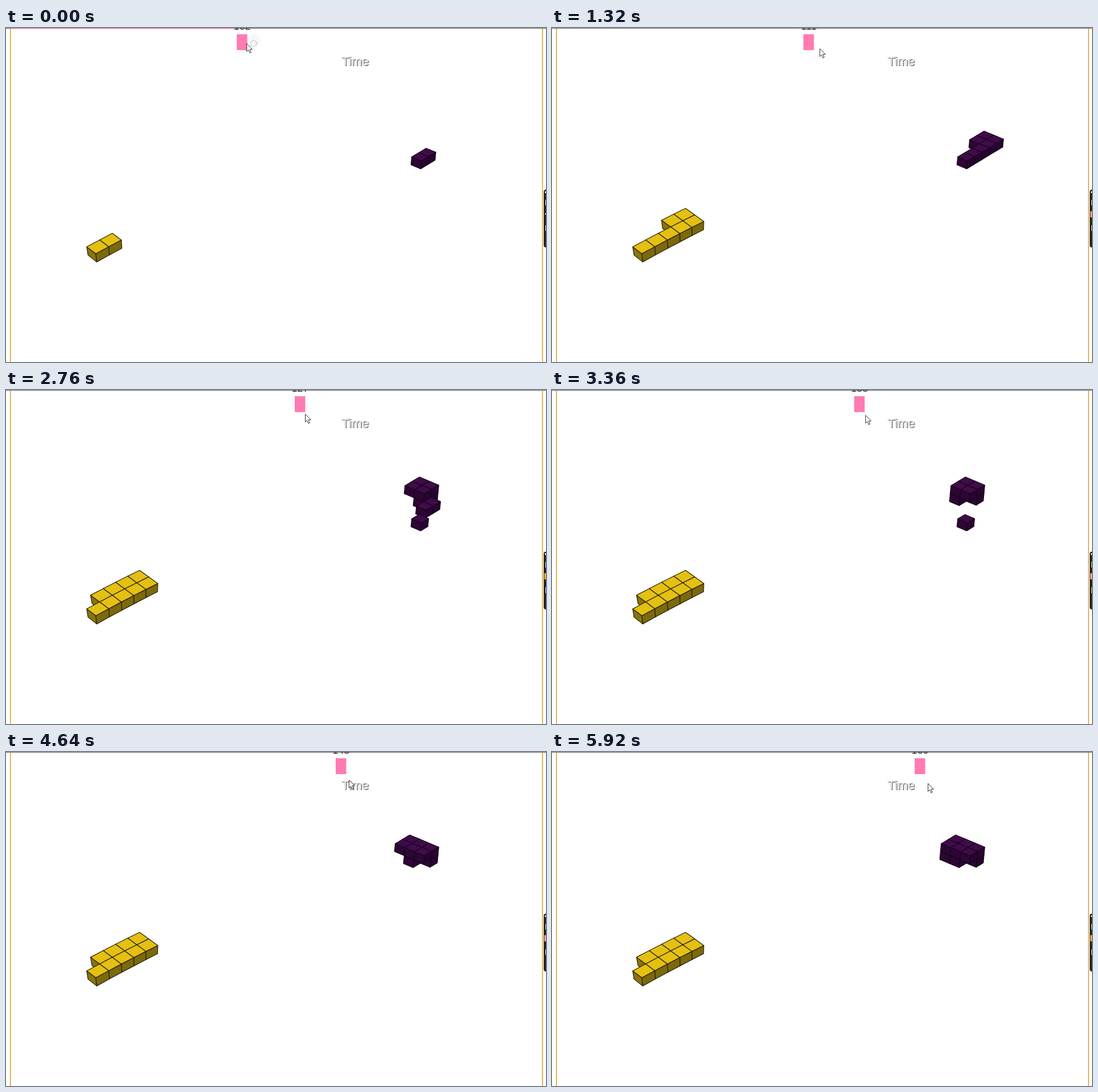
These frames come from a looping animation (950 px wide and 589 px high, 5.96 s). An HTML page with a canvas:

```html
<!DOCTYPE html>
<html lang="en">
<head>
<meta charset="utf-8">
<title>Blocks over time</title>
<style>
html, body { margin: 0; width: 100%; height: 100%; overflow: hidden; background: #fff; }
canvas { display: block; }
</style>
</head>
<body>
<canvas id="stage" width="950" height="589"></canvas>
<script>
const ctx = document.getElementById('stage').getContext('2d');
const LOOP = 5960, STEP = 40, HOLD = 120;

// Motion keys share one list of times.
const times = [0, 120, 680, 2000, 2760, 3880, 4640, 5920];
const barX = [406, 406, 419, 467, 508, 552, 580, 638];
const cursorX = [423, 423, 444, 499, 526, 573, 603, 661];
const cursorY = [27, 27, 33, 39, 42, 46, 49, 55];

function at(keys, t) {
  let i = 1;
  while (i < times.length - 1 && t > times[i]) i++;
  const k = (t - times[i - 1]) / (times[i] - times[i - 1]);
  return keys[i - 1] + (keys[i] - keys[i - 1]) * Math.min(k, 1);
}

// Top corner of grid point (u, v) and the drop to the bottom corner.
const yellow = {
  top: '#e4c012', left: '#88740f', right: '#7c690c', edge: '#241e04', line: 1.2, cubes: [],
  point(u, v) {
    const bend = 0.23 * u * (5 - u);
    return [126 + 21.8 * u + 16 * v + bend, 374 - 11.2 * u + 12 * v - 0.08 * u * v - bend];
  },
  drop: (u, v) => [3 - 0.7 * v - 0.4 * u, 14.6]
};
const purple = {
  top: '#400b49', left: '#2d0634', right: '#270530', edge: '#15021a', line: 1.1, cubes: [],
  point: (u, v) => [743 + 17.1 * v + 12.7 * (u - 5), 174.5 + 7.15 * v - 7.7 * (u - 5)],
  drop: () => [-1.3, 14]
};

// Row of cubes from u = a to b, added one by one every gap ms and removed at end.
function row(shape, a, b, v, z, start, gap = 0, end = LOOP) {
  const dir = Math.sign(b - a) || 1;
  for (let n = 0; n <= Math.abs(b - a); n++)
    shape.cubes.push({ u: a + n * dir, v, z, start: start + n * gap, end });
}

row(yellow, 0, 0, 1, 0, 0);
row(yellow, 1, 1, 1, 0, 0, 0, 1840);
row(yellow, 1, 1, 1, 0, 2280);
row(yellow, 2, 4, 1, 0, 320, 240);
row(yellow, 4, 1, 0, 0, 1040, 160);
row(yellow, 0, 0, 0, 0, 1680, 0, 2600);

row(purple, 0, 0, 2, 0, 0, 0, 4280);
row(purple, 1, 1, 2, 0, 0, 0, 2080);
row(purple, 2, 4, 2, 0, 320, 240, 2240);
row(purple, 4, 4, 1, 0, 1040, 0, 2400);
row(purple, 3, 2, 1, 0, 1200, 160, 3040);
row(purple, 4, 4, 0, 0, 1560);
row(purple, 3, 3, 0, 0, 1760, 0, 3320);
row(purple, 4, 3, 0, 1, 2320, 120);
row(purple, 4, 3, -1, 1, 2560, 120);
row(purple, 4, 3, -1, 0, 2920, 160);
row(purple, 4, 3, -2, 1, 3440, 200);
row(purple, 4, 3, -2, 0, 5000, 240);

for (const s of [yellow, purple])
  s.cubes.sort((a, b) => a.v - b.v || b.u - a.u || a.z - b.z);

function polygon(points, fill, stroke) {
  ctx.beginPath();
  points.forEach(p => ctx.lineTo(...p));
  ctx.closePath();
  ctx.fillStyle = fill;
  ctx.fill();
  ctx.strokeStyle = stroke;
  ctx.stroke();
}

function drawCube(s, { u, v, z }) {
  const corner = (du, dv, level) => {
    const [x, y] = s.point(u + du, v + dv), [dx, dy] = s.drop(u + du, v + dv);
    return [x - dx * level, y - dy * level];
  };
  const left = corner(0, 0, z), front = corner(0, 1, z);
  const right = corner(1, 1, z), back = corner(1, 0, z);
  const low = corner(0, 1, z - 1);
  polygon([left, front, low, corner(0, 0, z - 1)], s.left, s.edge);
  polygon([front, right, corner(1, 1, z - 1), low], s.right, s.edge);
  polygon([left, back, right, front], s.top, s.edge);
}

function drawShape(s, t) {
  ctx.lineWidth = s.line;
  ctx.lineJoin = 'round';
  for (const c of s.cubes) if (t >= c.start && t < c.end) drawCube(s, c);
}

function rect(color, x, y, w, h) {
  ctx.fillStyle = color;
  ctx.fillRect(x, y, w, h);
}

function text(str, x, y, color) {
  ctx.fillStyle = color;
  ctx.fillText(str, x, y);
}

function drawFrame(t) {
  rect('#d9a62e', 7, 0, 1.6, 589);
  rect('#d9a62e', 943, 0, 1.6, 589);
  rect('#8b8b8b', 0, 0, 950, 1.4);
  if (t < 400) rect('#f58db5', 8, 0, 393, 1.4);
  else if (t < 1300) rect('#d3a3b6', 440, 0, 503, 1.4);
}

function drawSidePanel(t) {
  ctx.fillStyle = '#242424';
  ctx.beginPath();
  ctx.roundRect(946, 285, 12, 102, 4);
  ctx.fill();
  rect('#ddd', 948, 288, 2, 3);
  rect('#eee', 949, 303, 1, 10);
  rect('#eee', 949, 348, 1, 10);
  const mark = t < 1320 ? '#ddd' : t < 2520 ? '#ef9d86' : t < 3120 ? '#dfb321'
    : t < 4320 ? '#f3a0a8' : t < 4920 ? '#eba58f' : '#e9a265';
  if (t < 1320) rect(mark, 948, 327, 2, 2);
  else rect(mark, 947, 323, 3, 11);
}

function drawBar(t) {
  const x = at(barX, t);
  ctx.font = '18px "Liberation Sans", Arial, sans-serif';
  ctx.textAlign = 'center';
  text(String(Math.round(x / 4)), x + 9.5, 2.6, '#333');
  rect('#ff7bb2', x, 11, 18.5, 28);
}

function drawTitle() {
  ctx.font = '22px "Liberation Sans", Arial, sans-serif';
  ctx.textAlign = 'left';
  text('Time', 590, 65.5, '#aaa');
  text('Time', 591.4, 66.8, '#444');
  text('Time', 590.5, 65.8, '#f4f4f4');
}

function drawCursor(t) {
  const x = at(cursorX, t), y = at(cursorY, t);
  if (t < 1300) {
    ctx.fillStyle = '#f6f6fd';
    ctx.beginPath();
    ctx.arc(x + 14, y - 6, 10, 0, 7);
    ctx.fill();
    ctx.strokeStyle = '#a9a9bd';
    ctx.lineWidth = 1.5;
    ctx.setLineDash([1.5, 1.5]);
    ctx.beginPath();
    ctx.arc(x + 12.5, y + 0.5, 5.3, t / 300, t / 300 + 2 * Math.PI);
    ctx.stroke();
    ctx.setLineDash([]);
  }
  ctx.save();
  ctx.translate(x + 0.5, y + 0.5);
  ctx.lineWidth = 1;
  polygon([[0, 0], [0, 14], [3, 11], [5.5, 16.5], [7.7, 15.5], [5.4, 10.2], [9.7, 10]], '#fff', '#333');
  ctx.restore();
}

function draw(now) {
  let t = Math.floor((now % LOOP) / STEP) * STEP;
  if (t < HOLD) t = 0;
  rect('#fff', 0, 0, 950, 589);
  drawFrame(t);
  drawSidePanel(t);
  drawShape(yellow, t);
  drawShape(purple, t);
  drawTitle();
  drawBar(t);
  drawCursor(t);
}

const begin = performance.now();
function tick() {
  draw(performance.now() - begin);
  requestAnimationFrame(tick);
}
tick();
</script>
</body>
</html>
```
